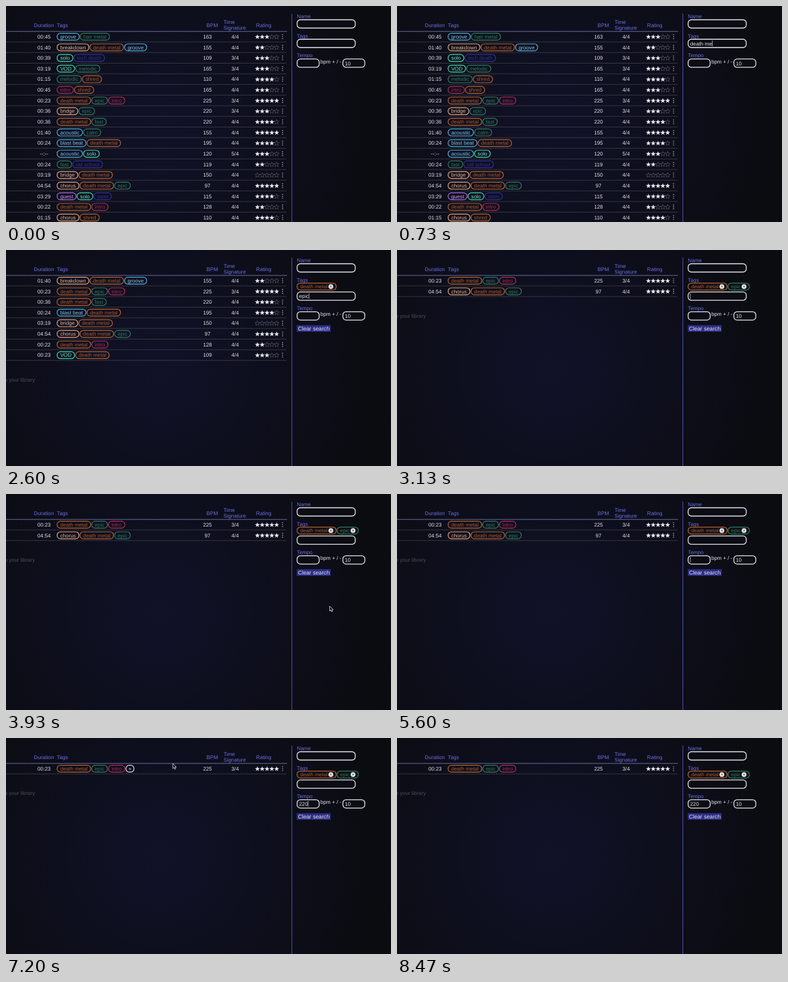
Animation of 600x338 px, one loop 8.54 s. Source, as an HTML page:

```html
<!DOCTYPE html>
<html lang="en">
<head>
<meta charset="utf-8">
<title>Riff library search</title>
<style>
  html, body { margin: 0; width: 100%; height: 100%; overflow: hidden; background: #0c0d14; }
  svg { display: block; width: 600px; height: 338px; }
  text {
    font: 8.2px "Liberation Sans", Arial, Helvetica, sans-serif;
    fill: #e4e4ea; text-rendering: geometricPrecision; white-space: pre;
  }
  .mid { text-anchor: middle; }
  .head { fill: #6d6ee2; }
  .hint { fill: #4c4d55; text-anchor: end; }
  .box { fill: #0b0c14; stroke: #e6e6ec; stroke-width: 1.3; }
  .rule { stroke: #3b3c46; stroke-width: .9; }
  .pill { fill: none; stroke-width: 1.2; }
  .star { fill: #e6e6f0; }
  .star.off { fill: none; stroke: #5b5c6c; stroke-width: .7; }
  .caret { stroke: #c8c8d0; stroke-width: .8; }
</style>
</head>
<body>
<svg id="stage" viewBox="0 0 600 338">
  <defs>
    <radialGradient id="glow" gradientUnits="userSpaceOnUse" cx="240" cy="184" r="370">
      <stop offset="0" stop-color="#111229"/>
      <stop offset=".4" stop-color="#0e0f1e"/>
      <stop offset=".75" stop-color="#0c0d15"/>
      <stop offset="1" stop-color="#0b0c0f"/>
    </radialGradient>
  </defs>
  <rect width="600" height="338" fill="url(#glow)"/>
</svg>
<script>
const LOOP = 8540, PITCH = 16.65, TOP = 48, SHIFT = 13.7;
const stage = document.getElementById('stage');

const BLUE = ['#4db2e2', '#86c4e4'], PEACH = ['#eda67c', '#e6b395'], MINT = ['#3fe0b4', '#7be6c8'],
      ORANGE = ['#bd6330', '#a9592c'], GREEN = ['#2f8060', '#34795d'], PINK = ['#b82c5c', '#a82c56'],
      INDIGO = ['#31329a', '#303190'], VIOLET = ['#b56cf0', '#cfa0f2'];
const tagColors = {
  groove: BLUE, acoustic: BLUE, 'blast beat': BLUE,
  breakdown: PEACH, bridge: PEACH, chorus: PEACH,
  solo: MINT, VOD: MINT, 'death metal': ORANGE, shred: ORANGE,
  'hair metal': GREEN, melodic: GREEN, epic: GREEN, fast: GREEN, calm: GREEN,
  intro: PINK, 'tech death': INDIGO, 'old school': INDIGO, stem: INDIGO, guest: VIOLET
};

// duration | tags | bpm | time signature | rating
const songs = `00:45|groove,hair metal|163|4/4|3
01:40|breakdown,death metal,groove|155|4/4|2
00:39|solo,tech death|109|3/4|3
03:19|VOD,melodic|165|3/4|3
01:15|melodic,shred|110|4/4|4
00:45|intro,shred|165|4/4|3
00:23|death metal,epic,intro|225|3/4|5
00:36|bridge,epic|220|3/4|3
00:36|death metal,fast|220|4/4|4
01:40|acoustic,calm|155|4/4|5
00:24|blast beat,death metal|195|4/4|4
--:--|acoustic,solo|120|5/4|3
00:24|fast,old school|119|4/4|2
03:19|bridge,death metal|150|4/4|0
04:54|chorus,death metal,epic|97|4/4|5
03:29|guest,solo,stem|115|4/4|4
00:22|death metal,intro|128|4/4|2
01:15|chorus,shred|110|4/4|4
00:23|VOD,death metal|109|4/4|3`.split('\n').map(line => {
  const [time, tags, bpm, sign, stars] = line.split('|');
  return { time, tags: tags.split(','), bpm: +bpm, sign, stars: +stars };
});

function add(parent, name, attrs = {}, content) {
  const node = document.createElementNS('http://www.w3.org/2000/svg', name);
  for (const key in attrs) node.setAttribute(key, attrs[key]);
  if (content !== undefined) node.textContent = content;
  return parent.appendChild(node);
}
// y is the middle of the capitals
const label = (parent, x, y, content, cls = '') =>
  add(parent, 'text', { x, y: y + 2.85, class: cls }, content);
const line = (parent, x1, y1, x2, y2, attrs) => add(parent, 'line', { x1, y1, x2, y2, ...attrs });
const box = (parent, x, y, width) =>
  add(parent, 'rect', { x, y: y - 6.5, width, height: 13, rx: 5, class: 'box' });
const show = (node, on) => node.setAttribute('visibility', on ? 'inherit' : 'hidden');
const place = (node, x, y) => node.setAttribute('transform', `translate(${x} ${y})`);

// Draws a tag and returns its right edge
function pill(parent, x, y, name, closable) {
  const [edge, ink] = tagColors[name];
  const text = label(parent, x + 4.7, y, name);
  text.style.fill = ink;
  const len = text.getComputedTextLength();
  const width = len + (closable ? 18 : 9.4);
  add(parent, 'rect', { x, y: y - 5.4, width, height: 10.8, rx: 5, class: 'pill', stroke: edge });
  if (closable) {
    const cx = x + len + 9.8;
    add(parent, 'circle', { cx, cy: y, r: 3.8, fill: '#e2e2e6' });
    add(parent, 'path', {
      d: `M${cx - 1.2} ${y - 1.2}l2.4 2.4m0 -2.4l-2.4 2.4`, stroke: '#33333b', 'stroke-width': .8
    });
  }
  return x + width;
}

function starPoints(cx) {
  return Array.from({ length: 10 }, (_, i) => {
    const r = i % 2 ? 1.75 : 4, a = i * Math.PI / 5;
    return `${(cx + r * Math.sin(a)).toFixed(2)},${(.3 - r * Math.cos(a)).toFixed(2)}`;
  }).join(' ');
}

function buildRow(song) {
  const g = add(stage, 'g');
  label(g, 59.3, 0, song.time, 'mid');
  let x = 79.7;
  for (const tag of song.tags) x = pill(g, x, 0, tag) + 1.7;
  label(g, 314, 0, song.bpm, 'mid');
  label(g, 357, 0, song.sign, 'mid');
  for (let i = 0; i < 5; i++)
    add(g, 'polygon', { points: starPoints(391.8 + 7.5 * i), class: i < song.stars ? 'star' : 'star off' });
  for (const cy of [-3, 0, 3]) add(g, 'circle', { cx: 431, cy, r: .8, fill: '#b4b4bc' });
  line(g, 0, 8.2, 437, 8.2, { class: 'rule' });
  const plus = add(g, 'g');
  add(plus, 'rect', { x: x + .2, y: -5.4, width: 12.4, height: 10.8, rx: 5, class: 'pill', stroke: '#e6e6ec' });
  label(plus, x + 6.4, 0, '+', 'mid');
  return { song, g, plus };
}

// Table
label(stage, 59, 29.7, 'Duration', 'head mid');
label(stage, 79.3, 29.7, 'Tags', 'head');
label(stage, 321.4, 29.7, 'BPM', 'head mid');
label(stage, 339, 25, 'Time', 'head');
label(stage, 339, 34, 'Signature', 'head');
label(stage, 389.8, 29.7, 'Rating', 'head');
line(stage, 0, 39.8, 438, 39.8, { stroke: '#6a6ba0', 'stroke-width': 1 });
line(stage, 445.5, 12, 445.5, 338, { stroke: '#4a4ea8', 'stroke-width': 1.1 });
const rows = songs.map(buildRow);
const hint = label(stage, 45, 0, 'Drop files here to add them to your library', 'hint');

// Search panel
label(stage, 453.3, 16, 'Name', 'head');
box(stage, 453.7, 28, 90.6);
label(stage, 453.3, 46.7, 'Tags', 'head');
const chips = ['death metal', 'epic'].map((name, i) => {
  const g = add(stage, 'g');
  pill(g, i ? 516 : 453.7, 57.2, name, true);
  return g;
});
const form = add(stage, 'g');
box(form, 453.7, 58.5, 90.6);
label(form, 453.3, 77.5, 'Tempo', 'head');
box(form, 453.7, 89.4, 34.4);
label(form, 490, 86.7, 'bpm + / -');
box(form, 525, 89.4, 34.2);
label(form, 528, 89.7, '10');
const tagText = label(form, 456.8, 58.7, '');
const tempoText = label(form, 456.8, 89.7, '');
const caret = line(form, 0, -4.5, 0, 4.5, { class: 'caret' });
const clear = add(stage, 'g');
add(clear, 'rect', { x: 453.2, y: 117.7, width: 52.8, height: 10.3, fill: '#2d2e88' });
label(clear, 479.6, 122.7, 'Clear search', 'mid').style.fontSize = '8.7px';

const pointer = add(stage, 'path', {
  d: 'M0 0V7.6L1.8 6L3 8.8L4.4 8.2L3.2 5.5H5.5Z',
  fill: '#0a0a0c', stroke: '#e8e8ec', 'stroke-width': .8, 'stroke-linejoin': 'round'
});

// Typing: [text, first key, time per key, time of Enter]
const typed = [['death metal', 190, 72, 1040], ['epic', 1900, 190, 2960]];
const tempo = ['220', 5660, 120];
const FOCUS = 100, TEMPO_FOCUS = 4550;
const keys = ([text, start, step], t) =>
  t < start ? 0 : Math.min(text.length, 1 + Math.floor((t - start) / step));

// Pointer passes: [time, x, y]
const passes = [
  [[3560, 502, 184], [3930, 504.5, 175.5], [4310, 468, 108], [4420, 462, 101]],
  [[6890, 468, 102], [7140, 262, 43], [7200, 260, 40], [7720, 257, 43], [8080, 250, -10]]
];
function pointerAt(t) {
  const path = passes.find(p => t >= p[0][0] && t < p[p.length - 1][0]);
  if (!path) return null;
  const i = path.findIndex(p => p[0] > t);
  const [t0, x0, y0] = path[i - 1], [t1, x1, y1] = path[i];
  const u = (t - t0) / (t1 - t0), k = u * u * (3 - 2 * u);
  return [x0 + (x1 - x0) * k, y0 + (y1 - y0) * k];
}

function draw(t) {
  const tags = typed.filter(w => t >= w[3]).map(w => w[0]);
  const word = typed.find(w => t >= w[1] && t < w[3]);
  const bpm = tempo[0].slice(0, keys(tempo, t));
  const wanted = bpm.length === 3 ? +bpm : 0;
  const at = pointerAt(t);

  let count = 0;
  for (const { song, g, plus } of rows) {
    const on = tags.every(tag => song.tags.includes(tag)) &&
      (!wanted || Math.abs(song.bpm - wanted) <= 10);
    const y = TOP + PITCH * count;
    show(g, on);
    if (!on) { show(plus, false); plus.setAttribute('visibility', 'hidden'); continue; }
    place(g, 0, y);
    show(plus, at && at[0] < 437 && Math.abs(at[1] - y) < 8.3);
    count++;
  }
  place(hint, 0, 69.5 + PITCH * count);

  chips.forEach((chip, i) => show(chip, i < tags.length));
  show(clear, tags.length);
  place(form, 0, tags.length ? SHIFT : 0);
  tagText.textContent = word ? word[0].slice(0, keys(word, t)) : '';
  tempoText.textContent = bpm;

  // The caret stays lit for half a second after each key, then blinks
  const inTempo = t >= TEMPO_FOCUS;
  const marks = [FOCUS, TEMPO_FOCUS];
  for (const w of [...typed, tempo]) {
    for (let i = 0; i < w[0].length; i++) marks.push(w[1] + i * w[2]);
    if (w[3]) marks.push(w[3]);
  }
  const last = Math.max(...marks.filter(m => m <= t));
  show(caret, t >= FOCUS && (t - last) % 1000 < 500);
  const field = inTempo ? tempoText : tagText;
  const len = field.textContent ? field.getComputedTextLength() : 0;
  place(caret, 457.2 + len, inTempo ? 89.4 : 58.5);

  show(pointer, at);
  if (at) place(pointer, ...at);
}

function tick() {
  draw(performance.now() % LOOP);
  requestAnimationFrame(tick);
}
tick();
</script>
</body>
</html>
```
